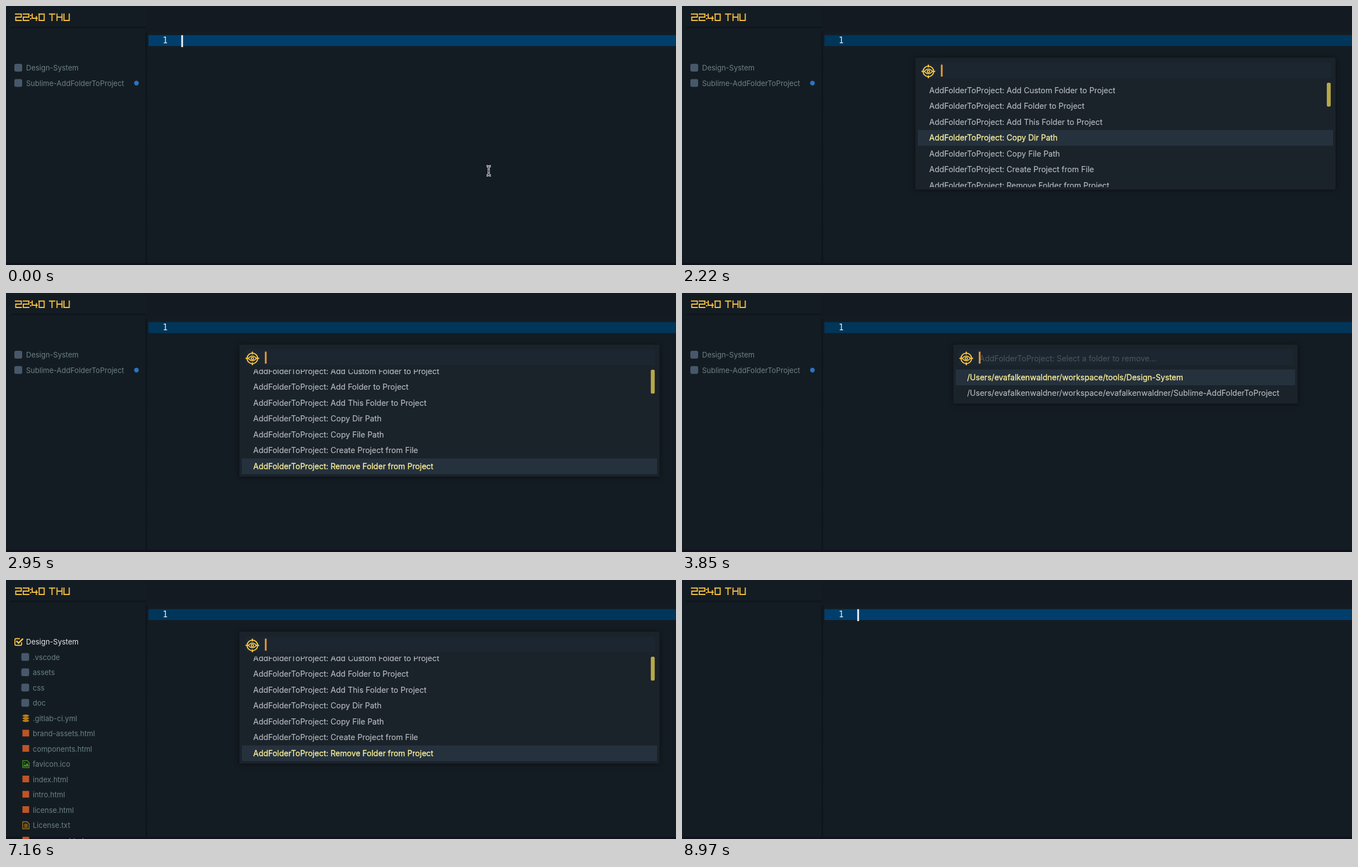
Write an HTML page that moves like this. It is 1202 px wide and 466 px high and loops after 9720 ms.

```html
<!DOCTYPE html>
<html lang="en">
<head>
<meta charset="utf-8">
<title>Remove folder from project</title>
<style>
html, body { margin: 0; width: 100%; height: 100%; overflow: hidden; background: #141c23; }
svg { display: block; width: 100vw; height: 100vh; }
text { font-family: Inter, "Open Sans", sans-serif; white-space: pre; }
.side { font-size: 13px; fill: #6b8087; }
.list { font-size: 14.05px; fill: #b5babe; stroke: #b5babe; stroke-width: .15; }
.hint { font-size: 14.05px; fill: #4f565b; }
.on { fill: #fdf196; stroke: #fdf196; stroke-width: .3; }
.num { font: 15px "DejaVu Sans Mono", monospace; fill: #e6ebef; }
.panel { filter: drop-shadow(0 1px 4px rgba(0, 0, 0, .55)); }
</style>
</head>
<body>
<svg viewBox="0 0 1202 466">
  <defs>
    <linearGradient id="down" x2="0" y2="1">
      <stop stop-color="#0d1218"/><stop offset="1" stop-color="#0d1218" stop-opacity="0"/>
    </linearGradient>
    <linearGradient id="across">
      <stop stop-color="#0d1218"/><stop offset="1" stop-color="#0d1218" stop-opacity="0"/>
    </linearGradient>
    <clipPath id="rows"><rect x="419" y="137.5" width="753" height="188.5"/></clipPath>
  </defs>
  <rect width="1202" height="466" fill="#141c23"/>
  <rect x="251" width="951" height="45" fill="#141a21"/>
  <rect y="462" width="1202" height="4" fill="#10131d"/>
  <rect x="8" y="37" width="243" height="4" fill="url(#down)"/>
  <rect x="250" y="46" width="5" height="416" fill="url(#across)"/>
  <path role="img" aria-label="22:40 THU" fill="none" stroke="#f9c440" stroke-width="1.9" d="
    M16 14.5H27.5V20H17.5V26H28.5 M30 14.5H41V20H31V26H42
    M43 17h2.5M43 23h2.5 M47 13.5V22H57M54.5 18V27
    M58 14.5H68.5V26H59.5V14.5
    M77 14.5H88.5M82.5 14.5V27 M91.5 13.5V27M91.5 20H100.5M100.5 13.5V27
    M104 13.5V26H113.5V13.5"/>
  <g id="scene"></g>
</svg>
<script>
const LOOP = 9720, PITCH = 28.5, TOP = 137.5;
const scene = document.getElementById('scene');

const COMMANDS = ['Add Custom Folder to Project', 'Add Folder to Project',
  'Add This Folder to Project', 'Copy Dir Path', 'Copy File Path',
  'Create Project from File', 'Remove Folder from Project'
].map(name => 'AddFolderToProject: ' + name);
const HOME = '/Users/evafalkenwaldner/workspace/';
const FOLDERS = [HOME + 'tools/Design-System',
  HOME + 'evafalkenwaldner/Sublime-AddFolderToProject'];
const FILES = ['.vscode', 'assets', 'css', 'doc', '.gitlab-ci.yml', 'brand-assets.html',
  'components.html', 'favicon.ico', 'index.html', 'intro.html', 'license.html',
  'License.txt', 'resources.html'];

// Each track lists [start ms, value] and holds the value until the next start.
const PANEL = [[0, ''], [330, 'commands'], [3850, 'both'], [6090, ''],
  [7160, 'commands'], [8070, 'one'], [8970, '']];
const TREE = [[0, 'closed'], [6090, 'open'], [8970, '']];
const POINTER = [[0, 'beam'], [330, 'arrow'], [2060, '']];
const COMMAND = [[0, 1], [2060, 2], [2220, 3], [2380, 4], [2540, 5], [2790, 6]];
const SCROLL = [[0, 0], [2790, 4], [2870, 8], [2950, 11]];
const BAR = [[0, 1], [1310, .5], [1400, 0], [2060, 1], [3450, .5], [3530, 0],
  [7160, 1], [7900, .5], [7980, 0]];
const FOLDER = [[0, 0], [5180, 1], [6090, 0]];

const at = (track, t) => track.filter(([start]) => start <= t).pop()[1];
const rect = (x, y, w, h, fill, more = '') =>
  `<rect x="${x}" y="${y}" width="${w}" height="${h}" fill="${fill}" ${more}/>`;
const text = (x, y, str, cls, fill) =>
  `<text x="${x}" y="${y}" class="${cls}" ${fill ? `style="fill:${fill}"` : ''}>${str}</text>`;
const line = (d, stroke, width, fill = 'none') =>
  `<path d="${d}" fill="${fill}" stroke="${stroke}" stroke-width="${width}"/>`;
const folderIcon = (x, y) => rect(x, y - 7, 14, 14, '#47586b', 'rx="3"');

function fileIcon(name, y) {
  if (name.endsWith('.html')) return rect(29.5, y - 7, 12, 12, '#bf5426');
  if (name.endsWith('.yml')) {
    return [-4.8, -.3, 4.2].map(dy =>
      `<ellipse cx="35.5" cy="${y + dy}" rx="6" ry="2.2" fill="#b97f16"/>`).join('');
  }
  if (name.endsWith('.ico')) {
    return line(`M30 ${y - 6.5}h8l3.5 3.5v9h-11.5z`, '#43901a', 1.4) +
      `<path d="M31.5 ${y + 4}v-2l2-2 1.5 1.5 3-4 2 3v3.5z" fill="#43901a"/>` +
      `<circle cx="33.5" cy="${y - 2.5}" r="1.3" fill="#43901a"/>`;
  }
  if (name.endsWith('.txt')) {
    return line(`M30 ${y - 6.5}h8l3.5 3.5v9h-11.5z M32.5 ${y - 2}h6.5m-6.5 2.5h6.5m-6.5 2.5h6.5`,
      '#ab791b', 1.3);
  }
  return folderIcon(27.5, y - .5);
}

function sidebar(state) {
  if (!state) return '';
  if (state === 'closed') {
    return folderIcon(15, 111) + text(36, 116, 'Design-System', 'side') +
      folderIcon(15, 138.5) + text(36, 143.5, 'Sublime-AddFolderToProject', 'side') +
      '<circle cx="234" cy="138.8" r="4.2" fill="#2a74c5"/>';
  }
  return line('M28 112v3.5q0 2-2 2h-8q-2 0-2-2v-8q0-2 2-2h7', '#f5c242', 1.8) +
    line('M18.5 109.5l4 4 8-8', '#f5c242', 2.6) +
    text(36, 116, 'Design-System', 'side', '#e4e8ea') +
    FILES.map((name, i) => {
      const y = 139 + 27.5 * i;
      return fileIcon(name, y) + text(48, y + 4.7, name, 'side');
    }).join('');
}

function editor(active) {
  return rect(255.5, 52.5, 946.5, 19.5, active ? '#003f6c' : '#01365b') +
    text(281, 67, '1', 'num') +
    (active ? rect(314.5, 52.5, 3, 21.5, '#f4f7f9') : '');
}

const eye = x => `<g transform="translate(${x} 117.7)" fill="none" stroke="#f5c242">
  <circle r="9.5" stroke-width="2"/>
  <path d="M0-12.3v5M0 12.3v-5M-12.3 0h5M12.3 0h-5" stroke-width="2.2"/>
  <path d="M-7.2 0Q0-8.5 7.2 0Q0 8.5-7.2 0z" stroke-width="1.8"/>
  <circle r="2.1" stroke-width="1.8"/></g>`;

function panel(x, right, bottom, items, selected, scroll, hint) {
  const rows = items.map((item, i) => {
    const y = TOP + PITCH * i - scroll, on = i === selected;
    return (on ? rect(x + 4.5, y, right - x - 9, PITCH, '#25313d') : '') +
      text(x + 25, y + 19, item, on ? 'list on' : 'list');
  }).join('');
  return rect(x, 93, right - x, bottom - 93, '#1a222a', 'rx="2" class="panel"') +
    rect(x + 10, 101, right - x - 18, 29, '#1c2630', 'rx="2"') +
    eye(x + 23.5) +
    (hint ? text(x + 47, 123, hint, 'hint') : '') +
    rect(x + 46, 105.5, 3, 21.5, '#f09c36') +
    `<g ${hint ? '' : 'clip-path="url(#rows)"'}>${rows}</g>`;
}

function overlay(kind, t) {
  if (!kind) return '';
  if (kind === 'commands') {
    return panel(418.5, 1172.5, 330.5, COMMANDS, at(COMMAND, t), at(SCROLL, t)) +
      rect(1156.8, 138, 7, 43, '#b7a948', `rx="2.5" opacity="${at(BAR, t)}"`);
  }
  const hint = 'AddFolderToProject: Select a folder to remove...';
  return kind === 'both'
    ? panel(486.5, 1104.5, 199, FOLDERS, at(FOLDER, t), 0, hint)
    : panel(509.5, 1081.5, 170.5, FOLDERS.slice(0, 1), 0, 0, hint);
}

function pointer(kind) {
  if (kind === 'beam') {
    const d = 'M862 288q4 0 4 3q0-3 4-3M866 291v11M862 305q4 0 4-3q0 3 4 3M864 297h4';
    return line(d, '#f2f4f5', 3.4) + line(d, '#11161b', 1.2);
  }
  return kind === 'arrow'
    ? line('M865.3 294.5v15.2l3.4-3.2 2.3 5.6 2.6-1.1-2.3-5.4h4.6z', '#f2f4f5', 1.3, '#0b0e11')
    : '';
}

let last = '';
function draw(t) {
  const kind = at(PANEL, t);
  const markup = sidebar(at(TREE, t)) + editor(!kind) + overlay(kind, t) + pointer(at(POINTER, t));
  if (markup !== last) scene.innerHTML = last = markup;
}

const begin = performance.now();
function tick() {
  draw((performance.now() - begin) % LOOP);
  requestAnimationFrame(tick);
}
tick();
</script>
</body>
</html>
```
